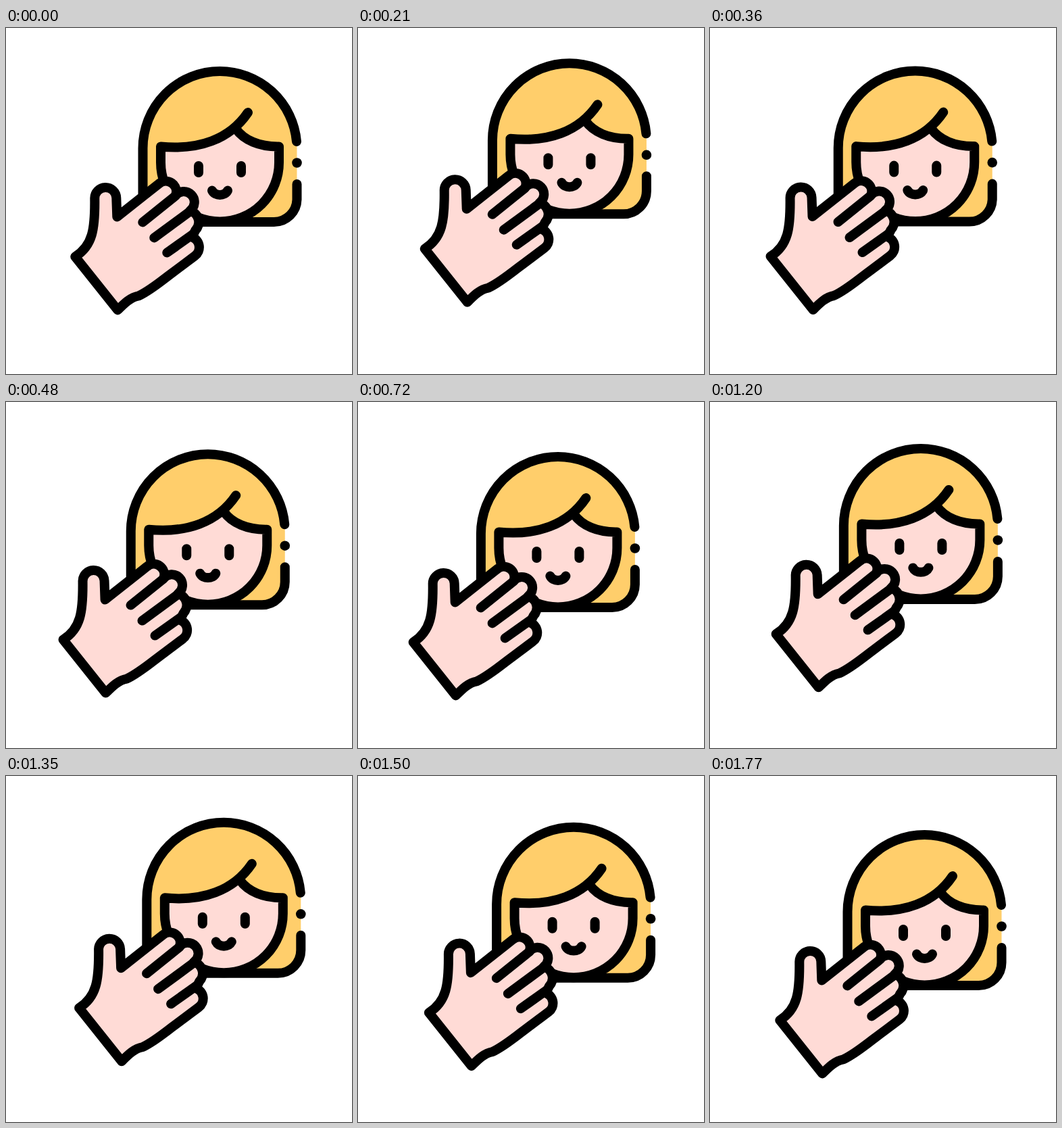
An HTML page that plays this animation: 512x512 px, repeating every 1.8 s.

```html
<!DOCTYPE html>
<html lang="en">
<head>
<meta charset="utf-8">
<title>Waving hello</title>
<style>
  html, body { margin: 0; width: 100%; height: 100%; overflow: hidden; background: #fff; }
  svg { display: block; width: 100%; height: 100%; }
  .ink { fill: none; stroke: #000; stroke-width: 14; stroke-linecap: round; stroke-linejoin: round; }
  .hair { fill: #ffce6b; }
  .skin { fill: #ffdbd6; }
</style>
</head>
<body>
<svg viewBox="0 0 512 512">
  <g id="scene">
    <g id="head">
      <path class="hair" d="M202.5 250V178A114 114 0 0 1 430.5 178V253A34 34 0 0 1 396.5 287H290Z"/>
      <g class="ink">
        <path d="M202.5 250V178A114 114 0 0 1 316.5 64A114 114 0 0 1 430 168"/>
        <path d="M430.5 231V253A34 34 0 0 1 396.5 287H290"/>
        <path class="skin" d="M358 125C331 165 285 181 229 175.5V199A87.5 87.5 0 0 0 404 199V175.5C375 176 352 166 340 149"/>
        <path d="M285 204V214M348 204V214"/>
        <path d="M305 240.5C309 249 324 249 328 240.5"/>
      </g>
      <circle cx="430.5" cy="199.5" r="7.3"/>
    </g>
    <g id="hand" class="ink" transform="translate(-0.7 0.4)">
      <path class="skin" d="M103 338C129 322 132.5 297 132 252A16 16 0 0 1 164 251L165 279L227 230
        A15.5 15.5 0 0 1 251.5 247.5A15.7 15.7 0 1 1 273 270A17.5 17.5 0 0 1 281 299L276 309
        A16 16 0 0 1 280 337L240 367C222 381 208 391 197 396C185 398 176 407 166 417Z"/>
      <path d="M203 287L251.5 248M220 310L273 271M239 332L277 305"/>
    </g>
  </g>
</svg>
<script>
const LOOP = 1800, STEP = 30;
const scene = document.getElementById('scene');

// Turning points of the drift: [time in ms, offset in px]
const turnsX = [[90, 0], [510, -18], [950, -23.6], [1370, 6], [1600, 0.3], [1770, 1]];
const turnsY = [[0, 0], [210, -11.7], [560, 17], [740, 17], [1290, 4], [1770, 23]];

const smooth = u => u * u * (3 - 2 * u);
const clamp = u => Math.min(1, Math.max(0, u));

// Adds up the eased legs between neighbouring turning points
function drift(turns, t) {
  let value = turns[0][1];
  for (let i = 1; i < turns.length; i++) {
    const [t0, v0] = turns[i - 1], [t1, v1] = turns[i];
    value += (v1 - v0) * smooth(clamp((t - t0) / (t1 - t0)));
  }
  return value;
}

function draw(time) {
  const t = Math.floor((time % LOOP) / STEP) * STEP;
  scene.setAttribute('transform', `translate(${drift(turnsX, t)} ${drift(turnsY, t)})`);
}

const start = performance.now();
function tick() {
  draw(performance.now() - start);
  requestAnimationFrame(tick);
}
tick();
</script>
</body>
</html>
```
